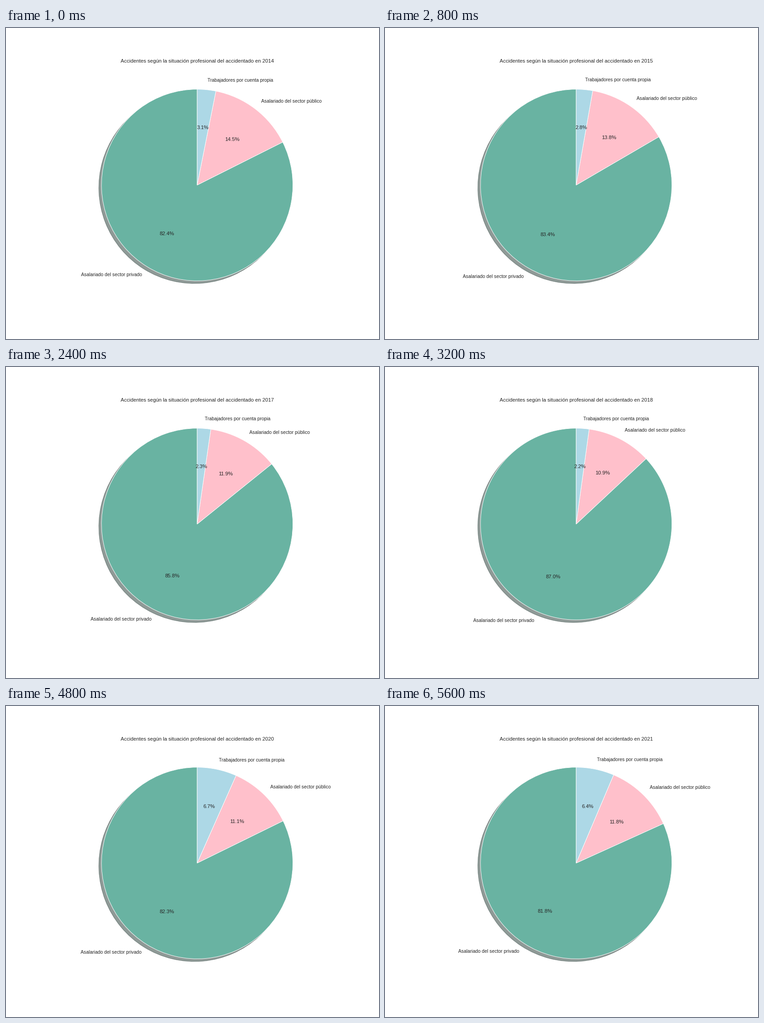
A matplotlib script that plays this animation: 820 by 683 pixels, repeating every 6400 ms.

```python
import matplotlib.pyplot as plt
from matplotlib.animation import FuncAnimation

WIDTH, HEIGHT, DPI = 820, 683, 64
SCALE = WIDTH / 12 / DPI  # the layout is a 12-inch-wide figure

plt.rcParams.update({
    "font.family": "Liberation Sans",
    "font.size": 12 * SCALE,
    "xtick.labelsize": 11 * SCALE,
    "axes.titlesize": 12 * SCALE,
    "axes.titlepad": 6 * SCALE,
    "text.color": "0.15",
    "axes.titlecolor": "0.15",
    "patch.edgecolor": "white",
    "patch.force_edgecolor": True,
    "patch.linewidth": SCALE,
})

LABELS = ["Asalariado del sector privado",
          "Asalariado del sector público",
          "Trabajadores por cuenta propia"]
COLORS = ["#69b3a2", "pink", "lightblue"]
SHADOW = {"ox": -2 / DPI, "oy": -2 / DPI}

# Yearly percentages; the public sector takes the remainder.
FIRST_YEAR = 2014
PRIVATE = [82.40, 83.40, 84.91, 85.80, 86.96, 85.08, 82.26, 81.76]
SELF_EMPLOYED = [3.14, 2.77, 2.53, 2.28, 2.17, 5.91, 6.66, 6.40]

fig, ax = plt.subplots(figsize=(WIDTH / DPI, HEIGHT / DPI), dpi=DPI,
                       facecolor="white")


def draw(i):
    private, own = PRIVATE[i], SELF_EMPLOYED[i]
    ax.clear()
    ax.pie([private, 100 - private - own, own], labels=LABELS, colors=COLORS,
           autopct="%1.1f%%", startangle=90, shadow=SHADOW)
    ax.set_title("Accidentes según la situación profesional "
                 f"del accidentado en {FIRST_YEAR + i}")
    return []


anim = FuncAnimation(fig, draw, frames=len(PRIVATE), interval=800,
                     init_func=lambda: draw(0), repeat=True, repeat_delay=0)
plt.show()
```
